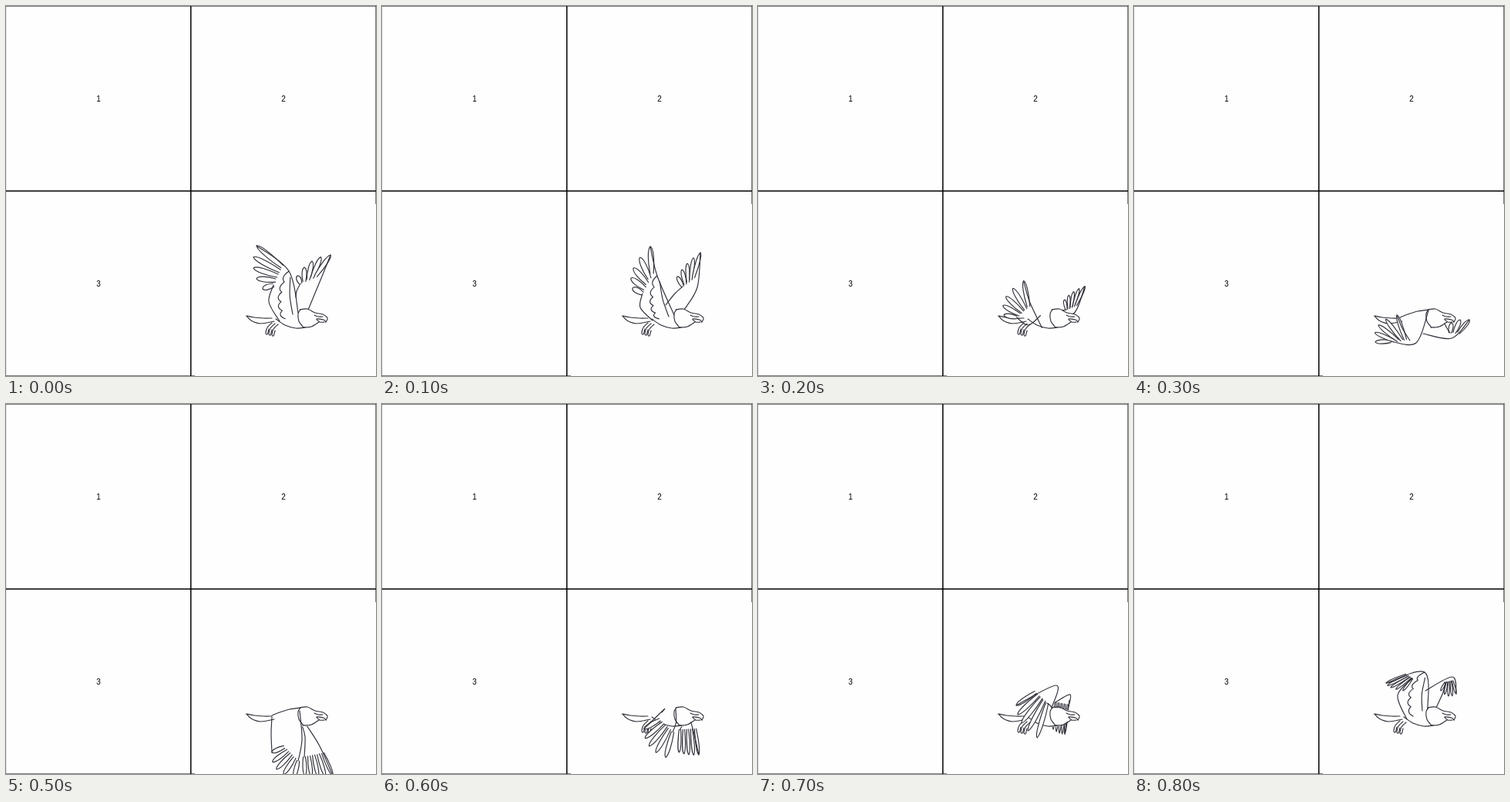
Write an HTML page with a canvas that moves like this. It is 480 px wide and 480 px high and loops after 0.9 s.

```html
<!DOCTYPE html>
<html lang="en">
<head>
<meta charset="utf-8">
<title>Eagle flight cycle</title>
<style>
html, body { margin: 0; width: 100%; height: 100%; overflow: hidden; background: #fff; }
canvas { display: block; }
</style>
</head>
<body>
<canvas id="stage" width="480" height="480"></canvas>
<script>
const STEP = 100, POSES = 9, PAPER = '#fefefe';
const ctx = document.getElementById('stage').getContext('2d');

const points = text => text.split(' ').map(p => p.split(',').map(Number));
const lerp = (a, b, t) => a.map((v, k) => v + (b[k] - v) * t);
const dist = (a, b) => Math.hypot(a[0] - b[0], a[1] - b[1]);
const shift = (p, dx, dy) => [p[0] + dx, p[1] + dy];

// Point on the parabola that passes a, m and b at t = 0, 0.5 and 1.
const arc = (a, m, b, t) => a.map((v, k) =>
  v * (1 - t) * (1 - 2 * t) + m[k] * 4 * t * (1 - t) + b[k] * t * (2 * t - 1));

// Smooth curve through all the points.
function curve(pts, fill) {
  const at = i => pts[Math.max(0, Math.min(pts.length - 1, i))];
  ctx.beginPath();
  ctx.moveTo(...pts[0]);
  for (let i = 0; i < pts.length - 1; i++) {
    const [a, b, c, d] = [at(i - 1), at(i), at(i + 1), at(i + 2)];
    ctx.bezierCurveTo(
      b[0] + (c[0] - a[0]) / 6, b[1] + (c[1] - a[1]) / 6,
      c[0] - (d[0] - b[0]) / 6, c[1] - (d[1] - b[1]) / 6, ...c);
  }
  if (fill) ctx.fill(); else ctx.stroke();
}
const ink = text => curve(points(text));

function feather(root, tip, width) {
  const len = dist(root, tip);
  const side = [(root[1] - tip[1]) / len * width, (tip[0] - root[0]) / len * width];
  const edge = (t, s) => shift(lerp(root, tip, t), side[0] * s, side[1] * s);
  ctx.beginPath();
  ctx.moveTo(...edge(0, 0.5));
  ctx.bezierCurveTo(...edge(0.45, 1), ...edge(0.95, 1), ...tip);
  ctx.bezierCurveTo(...edge(0.9, -0.9), ...edge(0.45, -1), ...edge(0, -0.5));
  ctx.fill();
  ctx.stroke();
}

// Wing points: shoulder, wrist, first, middle and last tip,
// first and last feather root, trailing bend, trailing end.
const near = {
  0: points('379,398 367,344 325,311 321,340 333,367 358,338 347,362 341,384 355,409'),
  1: points('379,401 357,350 348,312 326,340 325,366 350,347 338,373 335,391 351,408'),
  3: points('358,434 348,418 341,401 317,414 313,436 352,433 333,435 366,437 382,395'),
  5: points('345,406 344,428 345,452 351,474 374,484 361,445 379,463 384,435 381,398'),
  7: points('381,394 387,365 335,391 342,414 362,433 360,374 375,388 379,391 381,394'),
  8: points('381,396 377,348 327,362 333,368 349,372 353,351 361,356 342,378 354,409')
};
const far = {
  0: points('392,394 409,353 421,323 397,331 378,350 402,350 382,360 377,370 376,378'),
  1: points('392,394 409,365 413,320 396,334 383,351 404,352 390,364 380,373 368,388'),
  3: points('375,425 412,431 435,407 423,407 412,411 421,424 410,424 406,418 403,412'),
  5: points('390,417 407,444 424,482 405,483 388,482 411,453 387,458 388,432 384,417'),
  7: points('404,384 401,405 398,428 391,427 383,422 402,390 386,387 405,377 402,396'),
  8: points('378,372 413,354 418,376 408,379 398,372 413,359 404,361 401,374 392,394')
};

// Poses without keys lie halfway between their neighbours.
const wingAt = (keys, i) =>
  keys[i] || keys[i - 1].map((p, k) => lerp(p, keys[i + 1][k], 0.5));

function wing([shoulder, wrist, first, middle, last, rootA, rootB, bend, end], count) {
  const width = (dist(first, last) + dist(rootA, rootB)) / (count - 1) * 0.2;
  for (let i = count - 1; i >= 0; i--) {
    const t = i / (count - 1);
    feather(lerp(rootA, rootB, t), arc(first, middle, last, t), width);
  }
  curve([shoulder, wrist, first]);
  curve([rootB, bend, end]);
}

// Scalloped small feathers and the fold behind the leading edge.
function coverts([shoulder, wrist, , , , , , bend, end]) {
  const mid = lerp(lerp(shoulder, wrist, 0.5), bend, 0.5);
  const tail = lerp(end, shoulder, 0.3);
  const lobes = 5;
  ctx.beginPath();
  ctx.moveTo(...wrist);
  for (let i = 1; i <= lobes; i++) {
    const bump = arc(wrist, mid, tail, (i - 0.5) / lobes);
    ctx.quadraticCurveTo(...shift(bump, -8, 1), ...arc(wrist, mid, tail, i / lobes));
  }
  ctx.stroke();
  curve([lerp(wrist, shoulder, 0.15), shift(lerp(wrist, shoulder, 0.6), -6, 0), shift(shoulder, -7, 2)]);
}

function feet() {
  for (let i = 0; i < 3; i++) {
    const x = 345 + i * 4, y = 411 + i;
    curve([[x, y], [x - 6, y + 6], [x - 8, y + 13], [x - 6, y + 15], [x - 4, y + 8]]);
  }
}

function body(lowered) {
  curve(points('345,405 368,397 382,394 398,396 411,401 416,406 404,410 393,417 376,418 350,408'), true);
  ink('312,402 322,404 334,405 345,405');
  ink('312,402 318,408 330,412 348,409');
  if (lowered) {
    ink('345,404 355,400 368,396 382,394');
  } else {
    ink('350,406 362,414 376,418 388,417');
    feet();
  }
}

function head() {
  ink('381,394 391,393 401,398 411,400 417,405 415,410');
  ink('415,410 412,407 403,406 407,410 413,410');
  ink('406,410 396,416 385,417');
  ink('382,394 379,399 380,409 386,417');
  ink('400,401 405,403 411,403');
}

function grid() {
  ctx.fillStyle = '#000';
  ctx.strokeStyle = '#000';
  ctx.lineWidth = 1;
  ctx.font = '10px "Liberation Sans", Arial, sans-serif';
  ctx.textAlign = 'center';
  for (let i = 0; i < 4; i++) {
    const x = i % 2 * 240, y = Math.floor(i / 2) * 240;
    ctx.strokeRect(x, y, 240, 240);
    if (i < 3) ctx.fillText(i + 1, x + 120, y + 124);
  }
}

function draw(now) {
  const i = Math.floor(now / STEP) % POSES;
  const lowered = i >= 3 && i <= 5;
  const wingNear = wingAt(near, i);
  ctx.fillStyle = PAPER;
  ctx.fillRect(0, 0, 480, 480);
  grid();
  ctx.fillStyle = PAPER;
  ctx.fillRect(245, 257, 235, 223);
  ctx.strokeStyle = '#30303a';
  ctx.lineWidth = 1.15;
  ctx.lineCap = ctx.lineJoin = 'round';
  wing(wingAt(far, i), lowered && i < 5 ? 3 : 5);
  body(lowered);
  wing(wingNear, 5);
  if (i < 2 || i === POSES - 1) coverts(wingNear);
  head();
}

const start = performance.now();
function tick() {
  draw(performance.now() - start);
  requestAnimationFrame(tick);
}
tick();
</script>
</body>
</html>
```
